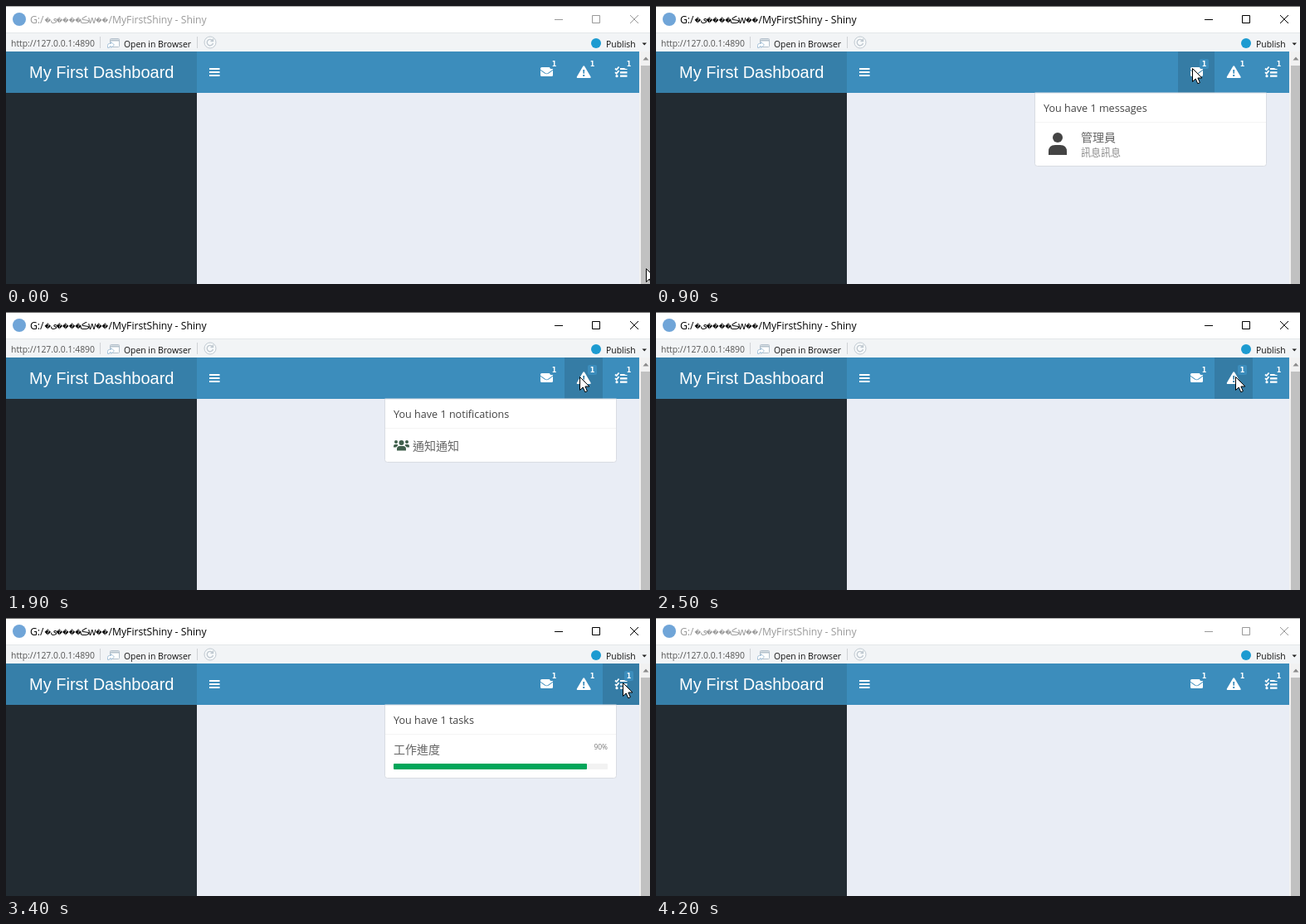
These frames come from a looping animation (776x336 px, 4300 ms). An HTML page:

```html
<!DOCTYPE html>
<html lang="en">
<head>
<meta charset="utf-8">
<title>Dashboard menus</title>
<style>
  html, body { margin: 0; width: 100%; height: 100%; overflow: hidden; background: #fff; }
  svg { display: block; }
  text { font-family: "Open Sans", "Noto Sans", sans-serif; white-space: pre; }
  .bar { font-size: 10.4px; fill: #111; }
  .url { fill: #555; }
  .name { font-size: 12.2px; }
  .odd { font: 7.4px "DejaVu Sans", sans-serif; }
  .arab { font: 11px "DejaVu Sans", sans-serif; }
  .brand { font: 20px "Liberation Sans", Arial, sans-serif; fill: #fff; }
  .badge { font: bold 8px "DejaVu Sans", sans-serif; fill: #fff; text-anchor: middle; }
  .head { font-size: 12.6px; fill: #444; }
  .cjk { font: 300 14px "Noto Sans CJK TC", "Noto Sans CJK", sans-serif; fill: #666; }
  .note { font-size: 12px; fill: #888; }
  .small { font-size: 8.4px; fill: #777; text-anchor: end; }
  #chrome { color: #999; }
  #chrome.active { color: #000; }
  .edge { fill: #aaa; }
  .active .edge { fill: #707070; }
  .hot { fill: #357ca5; }
  .menu, .hot { visibility: hidden; }
  .menu.on, .hot.on { visibility: visible; }
</style>
</head>
<body>
<svg width="776" height="336" viewBox="0 0 776 336">
  <!-- window title -->
  <rect width="776" height="336" fill="#fff"/>
  <circle cx="16" cy="16" r="8" fill="#70a5d8"/>
  <g id="chrome" fill="currentColor">
    <rect class="edge" width="776" height="1"/>
    <text class="name" x="29" y="21">G:/</text>
    <text class="odd" x="46.5" y="19.5">�</text>
    <text class="arab" x="53.5" y="20">ی</text>
    <text class="odd" x="60.5" y="19.5">����</text>
    <text class="arab" x="89" y="20">ڪ</text>
    <text class="name" x="99" y="21">w</text>
    <text class="odd" x="108" y="19.5">��</text>
    <text class="name" x="123.5" y="21">/MyFirstShiny - Shiny</text>
    <path d="M661 16.5h10M706.5 11.5h9v9h-9zM752 11l10 10m0-10l-10 10" fill="none" stroke="currentColor"/>
  </g>

  <!-- toolbar -->
  <rect y="32" width="776" height="23" fill="#f2f4f6"/>
  <rect y="32" width="776" height="1" fill="#e4e6e8"/>
  <text class="bar url" x="6" y="49">http://127.0.0.1:4890</text>
  <path d="M113.5 37v14M230.5 37v14" stroke="#cfd2d5"/>
  <g fill="#fff" stroke="#b3c0cb">
    <rect x="125.5" y="39.5" width="11" height="10" rx="1"/>
    <path d="M126 41.5h10" stroke-width="2"/>
    <path d="M122.5 50.5v-3q0-2 2-2h2v-2l4 3.5-4 3.5v-2h-1q-1 0-1 2z" stroke="#a9c4da"/>
  </g>
  <text class="bar" x="142" y="49.5">Open in Browser</text>
  <g fill="none" stroke="#c0c9d1">
    <circle cx="246" cy="44" r="7" fill="#f8fafb"/>
    <path d="M249 42a3.7 3.7 0 1 0 .5 3m0-5.500v3h-3" stroke-width="1.4"/>
  </g>
  <circle cx="711" cy="45" r="6" fill="#1d9bd1"/>
  <text class="bar" x="723" y="49.5">Publish</text>
  <path d="M766.5 44.5h5.5l-2.75 3z" fill="#222"/>

  <!-- page -->
  <rect y="55" width="230" height="50" fill="#367fa9"/>
  <rect x="230" y="55" width="533" height="50" fill="#3c8dbc"/>
  <rect y="105" width="230" height="231" fill="#222b32"/>
  <rect x="230" y="105" width="533" height="231" fill="#e9edf5"/>
  <rect x="763" y="55" width="13" height="281" fill="#f1f1f1"/>
  <rect x="765" y="72" width="11" height="264" fill="#c1c1c1"/>
  <path d="M767.5 65.5h7l-3.5-4z" fill="#8a8a8a"/>
  <text class="brand" x="28" y="87">My First Dashboard</text>
  <path d="M245 76h12.5m-12.5 4h12.5m-12.5 4h12.5" stroke="#fff" stroke-width="2.2"/>

  <g id="hots"></g>
  <g fill="#fff">
    <path transform="translate(644 74)" d="M0 3.700L5 7.400q2.500 1.600 5 0l5-3.700V9.500q0 1.500-1.500 1.500h-12Q0 11 0 9.500zM1.500 0h12Q15 0 15 1.500v1.200L9 7q-1.500 1-3 0L0 2.700V1.500Q0 0 1.500 0z"/>
    <path fill-rule="evenodd" d="M695 73.200q1.200-2 2.400 0l7 12q1 1.800-1.200 1.800h-14q-2.200 0-1.200-1.800zM695.200 77l.3 4.800h1.400l.3-4.800zM695.200 83v2h2v-2z"/>
    <path d="M740 76h8.500m-8.500 4.300h8.500m-8.500 4.300h8.500" stroke="#fff" stroke-width="2.2"/>
    <circle cx="736" cy="84.7" r="1.6"/>
    <path d="M734 75.500l1.600 1.500 3-3.500m-4.600 6.600l1.600 1.500 3-3.500" fill="none" stroke="#fff" stroke-width="1.8"/>
  </g>
  <g id="badges"></g>

  <!-- drop-down panels -->
  <g class="menu" data-h="89" data-head="You have 1 messages">
    <g fill="#444">
      <circle cx="484" cy="159" r="6"/>
      <path d="M473 180v-4q0-8 8-8h6q8 0 8 8v4z"/>
    </g>
    <text class="cjk" x="512" y="164">管理員</text>
    <text class="cjk note" x="512" y="182">訊息訊息</text>
  </g>
  <g class="menu" data-h="77" data-head="You have 1 notifications">
    <g fill="#40604c">
      <circle cx="476.5" cy="158" r="3"/>
      <circle cx="470" cy="157" r="2"/>
      <circle cx="483" cy="157" r="2"/>
      <path d="M471 167.500v-2q0-3.500 3.500-3.500h4q3.500 0 3.500 3.500v2zM467 163.500v-1.500q0-2 2-2h2.500l1 1-2.500 2.500zM486 163.500v-1.500q0-2-2-2h-2.500l-1 1 2.500 2.500z"/>
    </g>
    <text class="cjk" x="490" y="167">通知通知</text>
  </g>
  <g class="menu" data-h="89" data-head="You have 1 tasks">
    <text class="cjk" x="467" y="164">工作進度</text>
    <text class="small" x="725" y="159">90%</text>
    <rect x="467" y="176" width="258" height="7" rx="1" fill="#f2f2f2"/>
    <rect x="467" y="176" width="233" height="7" rx="1" fill="#00a65a"/>
  </g>

  <path id="cursor" d="M.5.5v16l3.700-3.500 2.600 5.800 2.600-1.200-2.500-5.600h5z" fill="#fff" stroke="#000"/>
</svg>
<script>
  const LOOP = 4300, STEP = 100, WAKE = 700, SLEEP = 4200;
  const $ = s => document.querySelector(s), all = s => [...document.querySelectorAll(s)];

  const icons = [
    { left: 629, right: 673, open: 700, close: 1400 },
    { left: 673, right: 719, open: 1800, close: 2300 },
    { left: 719, right: 763, open: 2800, close: 3500 }
  ];

  // pointer moves: from rest, begin, end, to x, y
  const home = [771, 317];
  const moves = [
    [0, 600, 646, 75],
    [1100, 1500, 660, 80],
    [1500, 1800, 691, 78],
    [1900, 2500, 698, 78],
    [2500, 2800, 743, 78],
    [3500, 3600, 731, 215],
    [3800, 4000, 790, 350]
  ];

  $("#hots").innerHTML = icons.map(({ left, right }) =>
    `<rect class="hot" x="${left}" y="55" width="${right - left}" height="50"/>`).join("");
  $("#badges").innerHTML = icons.map(({ right }) =>
    `<rect x="${right - 18}" y="64" width="11" height="12" rx="2" fill="#3c8dbc"/>
     <text class="badge" x="${right - 12.5}" y="73">1</text>`).join("");

  const menus = all(".menu"), hots = all(".hot");
  const cursor = $("#cursor"), chrome = $("#chrome");

  for (const m of menus) {
    const side = +m.dataset.h - 3.5;
    m.innerHTML = `<path d="M456.5 105v${side}q0 3 3 3h273q3 0 3-3v${-side}z" fill="#fff" stroke="#d9dce2"/>
      <path d="M457 140.5h278" stroke="#f4f4f4"/>
      <text class="head" x="467" y="128">${m.dataset.head}</text>` + m.innerHTML;
  }

  const ease = p => p * p * (3 - 2 * p);

  function pointAt(t) {
    let [x, y] = home;
    for (const [begin, end, toX, toY] of moves) {
      const p = ease(Math.min(1, Math.max(0, (t - begin) / (end - begin))));
      x += (toX - x) * p;
      y += (toY - y) * p;
    }
    return [Math.round(x), Math.round(y)];
  }

  function draw(now) {
    const t = Math.floor((now % LOOP) / STEP) * STEP;
    const [x, y] = pointAt(t);
    cursor.setAttribute("transform", `translate(${x} ${y})`);
    chrome.classList.toggle("active", t >= WAKE && t < SLEEP);
    icons.forEach(({ left, right, open, close }, i) => {
      const blur = icons[i + 1]?.open ?? SLEEP;
      const over = x >= left && x < right && y >= 55 && y < 105;
      hots[i].classList.toggle("on", over || (t >= open && t < blur));
      menus[i].classList.toggle("on", t >= open && t < close);
    });
  }

  const start = performance.now();
  function tick() {
    draw(performance.now() - start);
    requestAnimationFrame(tick);
  }
  tick();
</script>
</body>
</html>
```
